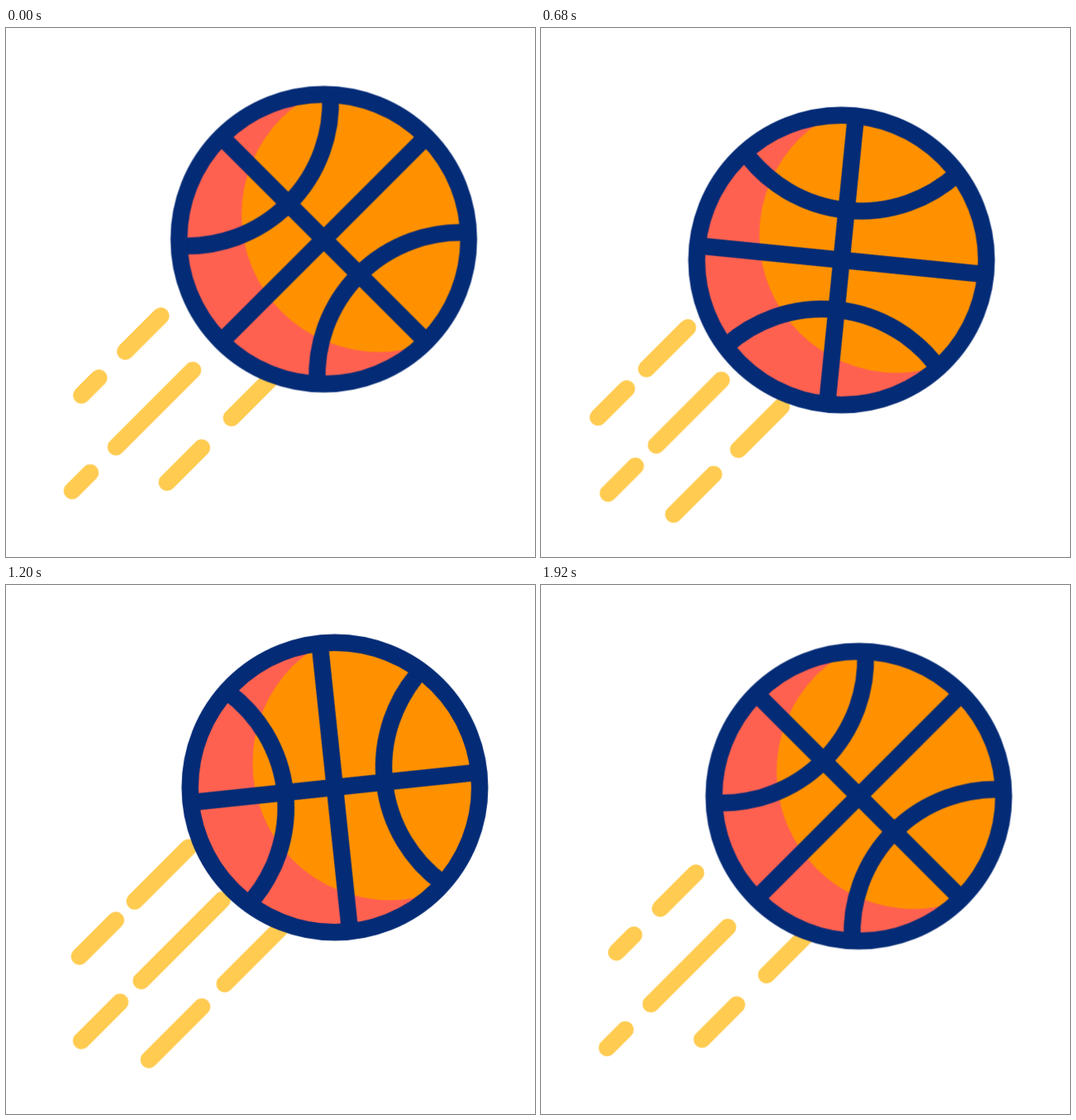
Recreate the animation shown at these times as an HTML page without scripts. Size 640 by 640 pixels, loop 2000 ms.

```html
<!DOCTYPE html>
<html lang="en">
<head>
<meta charset="utf-8">
<title>Flying basketball</title>
<style>
  html, body { margin: 0; width: 100%; height: 100%; overflow: hidden; background: #fff; }
  svg { display: block; width: 100vw; height: 100vh; }

  .fly, .trail, .seams {
    animation: 2s cubic-bezier(.3333, 0, .6667, 1) infinite;
  }
  .fly { animation-name: fly; }
  .trail { animation-name: trail; fill: none; stroke: #ffcb50; stroke-width: 14.5; stroke-linecap: round; }
  .seams { animation-name: spin; }
  .ink { fill: none; stroke: #042b76; stroke-width: 20.5; }

  @keyframes fly {
    0%, 3.6%, 90.6%, 100% { transform: translate(384.5px, 255.5px); }
    21.1% { transform: translate(443.5px, 197px); }
    44.4% { transform: translate(306.5px, 340.5px); }
    68.3% { transform: translate(432.5px, 208.5px); }
  }

  @keyframes spin {
    0%, 3.6% { transform: rotate(0deg); }
    90.6%, 100% { transform: rotate(180deg); }
  }

  /* Three rows of two dashes, measured backwards from the ball centre */
  @keyframes trail {
    0%, 3.6%, 90.6%, 100% {
      d: path("M145 52.25H188M220 52.25H241 M158.5 0H251.5M282.5 0H304.5 M112 -52.25H164M200 -52.25H242");
    }
    21.1% {
      d: path("M120.5 52.25H194M216 52.25H267.5 M127.5 0H242.5M268.5 0H327 M112.5 -52.25H191M218 -52.25H294");
    }
    44.4% {
      d: path("M143.5 52.25H176.5M202 52.25H224.5 M158 0H211M235.5 0H250.5 M134 -52.25H167M199 -52.25H228");
    }
    68.3% {
      d: path("M118 52.25H195M217 52.25H269 M128 0H243M269 0H328 M110 -52.25H192.5M218.5 -52.25H296");
    }
  }
</style>
</head>
<body>
<svg viewBox="0 0 640 640">
  <clipPath id="disc"><circle r="175"/></clipPath>
  <g class="fly">
    <g transform="rotate(135) scale(1.41421)">
      <path class="trail" d="M145 52.25H188M220 52.25H241 M158.5 0H251.5M282.5 0H304.5 M112 -52.25H164M200 -52.25H242"/>
    </g>
    <circle r="175" fill="#ff6150"/>
    <g clip-path="url(#disc)"><circle cx="66.5" cy="-29.5" r="166" fill="#ff9100"/></g>
    <g class="seams">
      <path class="ink" d="M-124 -124L124 124M-124 124L124 -124
        M8 -174.5A174 174 0 0 1 -174.5 8M-8 174.5A174 174 0 0 1 174.5 -8"/>
    </g>
    <circle class="ink" r="175.25"/>
  </g>
</svg>
</body>
</html>
```
